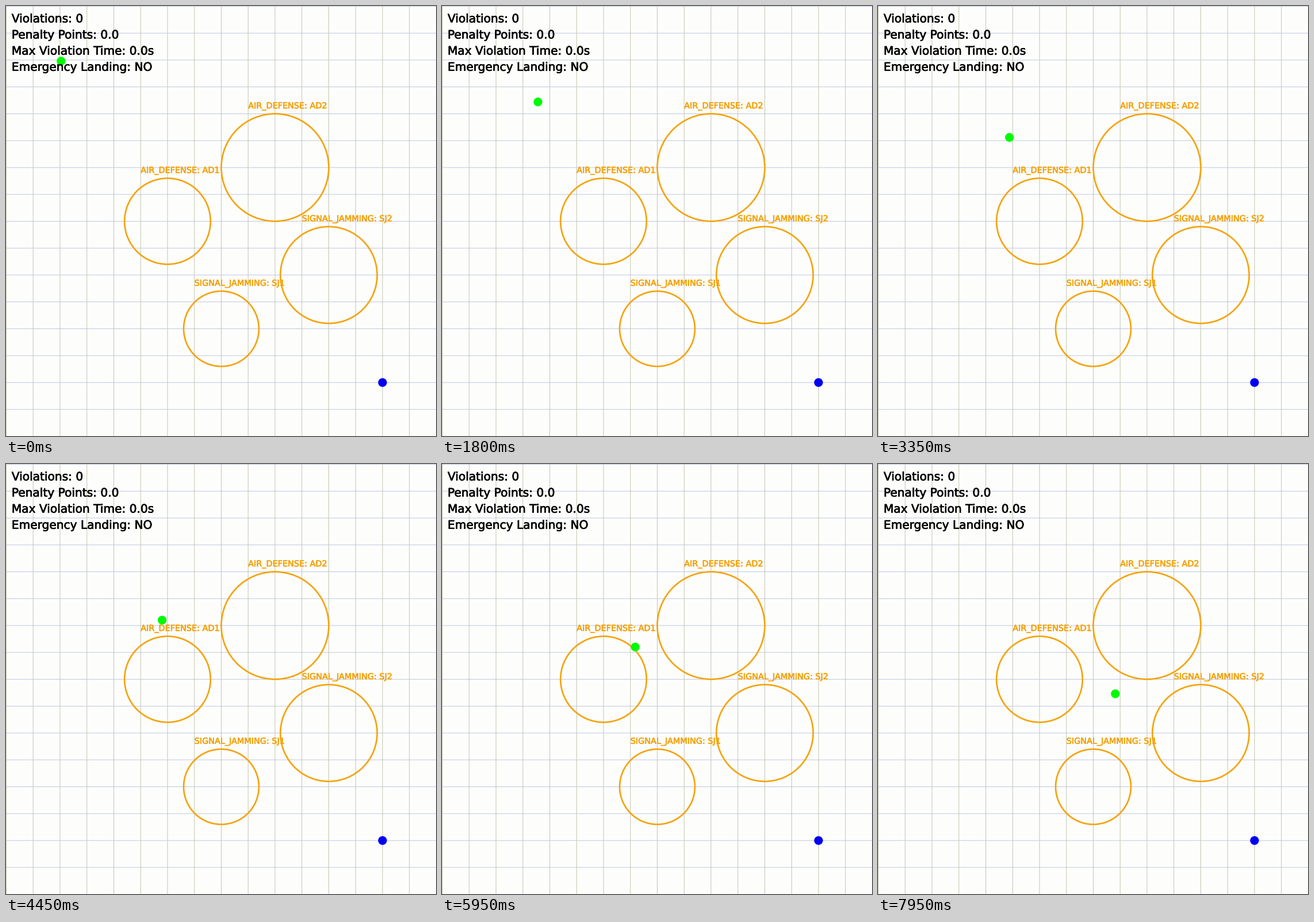
Write a matplotlib script that moves like this. It is 748 px wide and 748 px high and loops after 8000 ms.

```python
import math

import matplotlib.pyplot as plt
from matplotlib.animation import FuncAnimation
from matplotlib.patches import Circle
from matplotlib.patheffects import withStroke

SIZE, DPI = 748, 64
WORLD = 800
K = SIZE / WORLD
PT = 72 / DPI
FRAMES, INTERVAL = 160, 50

PAPER = "#fdfefc"
GRID_V, GRID_H = "#c4c4b0", "#c0c6e2"
ORANGE, GREEN, BLUE = "#f5a30d", "#00fa05", "#0000f0"


def px(v):
    return (v + 0.5) * K


def write(text, x, y, scale, color, z):
    ax.text(px(x), px(y), text, family="DejaVu Sans", fontsize=28.8 * scale * PT,
            color=color, ha="left", va="baseline", zorder=z,
            path_effects=[withStroke(linewidth=0.7 * PT, foreground=color)])


def disc(x, y, color, z):
    return ax.add_patch(Circle((px(x), px(y)), 7.6, color=color, lw=0, zorder=z))


fig = plt.figure(figsize=(SIZE / DPI, SIZE / DPI), dpi=DPI, facecolor=PAPER)
ax = fig.add_axes([0, 0, 1, 1])
ax.set_xlim(0, SIZE)
ax.set_ylim(SIZE, 0)
ax.axis("off")

for step in range(0, WORLD, 50):
    ax.axvline(px(step), color=GRID_V, lw=PT, zorder=1, snap=False)
    ax.axhline(px(step), color=GRID_H, lw=PT, zorder=1, snap=False)

ZONES = [
    ("AIR_DEFENSE: AD1", 300, 400, 80),
    ("AIR_DEFENSE: AD2", 500, 300, 100),
    ("SIGNAL_JAMMING: SJ1", 400, 600, 70),
    ("SIGNAL_JAMMING: SJ2", 600, 500, 90),
]
for name, x, y, r in ZONES:
    ax.add_patch(Circle((px(x), px(y)), r * K, fill=False, ec=ORANGE, lw=2.7 * PT, zorder=2))
    write(name, x - 50, y - r - 10, 0.5, ORANGE, 3)

STATUS = ["Violations: 0", "Penalty Points: 0.0", "Max Violation Time: 0.0s",
          "Emergency Landing: NO"]
for i, text in enumerate(STATUS):
    write(text, 10, 30 * (i + 1), 0.7, "black", 6)

START, GOAL = 100, 700
SPEED, ARC_SPEED = 3, 2.78
_, ZX, ZY, radius = ZONES[0]
CLEAR = radius + 4

# Straight run to the clearance ring, round it, then along the tangent to the goal.
foot = (ZX + ZY) / 2
reach = foot - math.sqrt((CLEAR ** 2 - (ZY - ZX) ** 2 / 2) / 2)
RUN = (reach - START) * math.sqrt(2) / SPEED
A0 = math.atan2(reach - ZY, reach - ZX)
gx, gy = GOAL - ZX, GOAL - ZY
A1 = math.atan2(gy, gx) - math.acos(CLEAR / math.hypot(gx, gy))
TURN = (A1 - A0) * CLEAR / ARC_SPEED


def drone_at(t):
    if t < RUN:
        d = START + t * SPEED / math.sqrt(2)
        return d, d
    a = min(A0 + (t - RUN) * ARC_SPEED / CLEAR, A1)
    x, y = ZX + CLEAR * math.cos(a), ZY + CLEAR * math.sin(a)
    rest = max(0, t - RUN - TURN) * SPEED
    return x - rest * math.sin(A1), y + rest * math.cos(A1)


disc(GOAL, GOAL, BLUE, 4)
drone = disc(START, START, GREEN, 5)


def draw(i):
    x, y = drone_at(i + 1)
    drone.center = px(int(x)), px(int(y))
    return (drone,)


anim = FuncAnimation(fig, draw, frames=FRAMES, interval=INTERVAL, repeat=True,
                     repeat_delay=0, blit=False)
plt.show()
```
